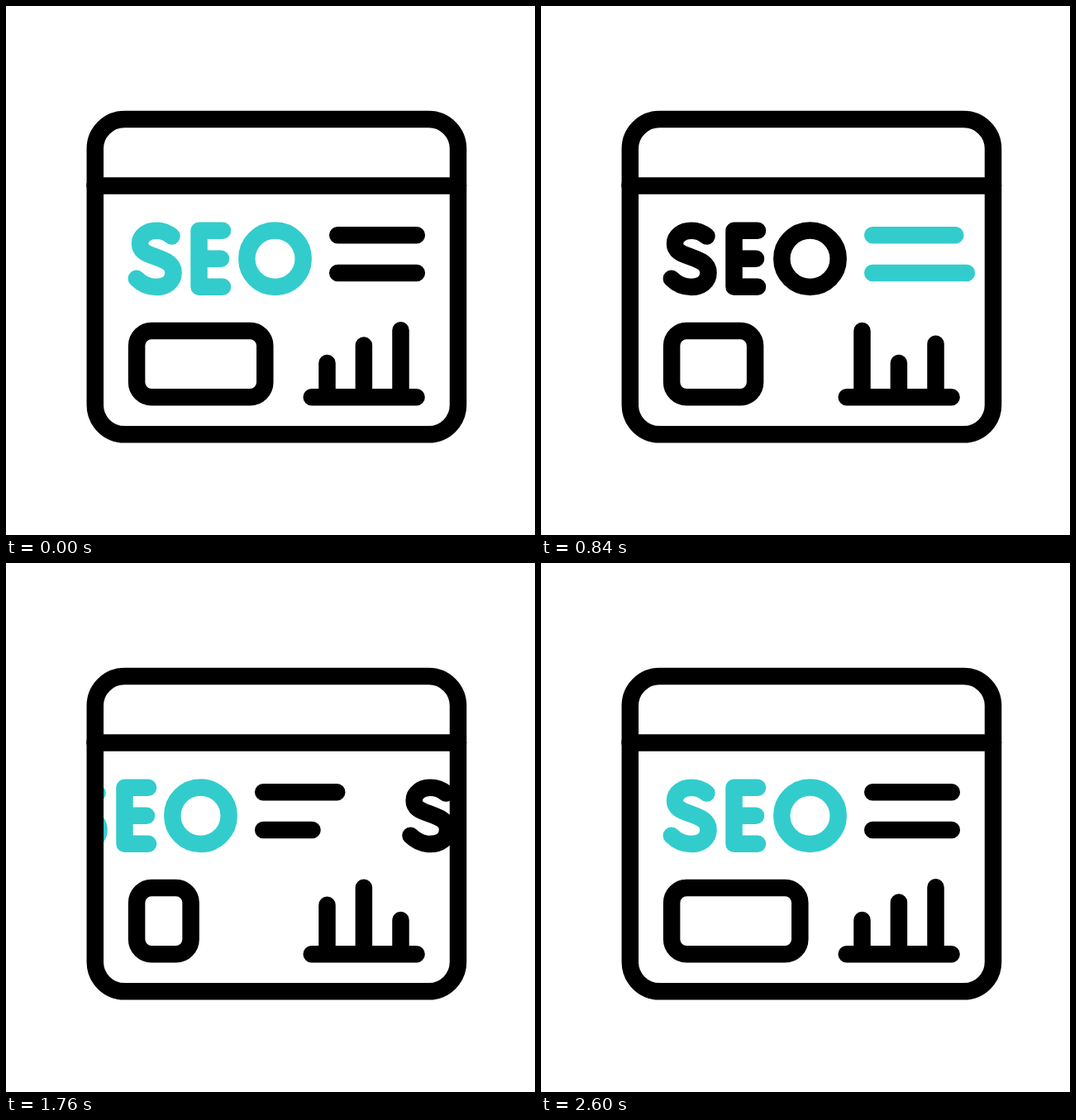
Animation, 640 px wide and 640 px high, one loop 2.62 s. Source, as an HTML page:

```html
<!DOCTYPE html>
<html lang="en">
<head>
<meta charset="utf-8">
<title>SEO browser window</title>
<style>
  html, body { margin: 0; height: 100%; overflow: hidden; background: #fff; }
  svg { display: block; width: 100%; height: 100%; }
  g { fill: none; stroke-width: 20.5; stroke-linecap: round; stroke-linejoin: round; }
  .ink { stroke: #000; }
  .teal { stroke: #3cc; }
</style>
</head>
<body>
<svg viewBox="0 0 640 640">
  <defs>
    <clipPath id="page"><rect x="112" y="222" width="431" height="290"/></clipPath>
    <g id="seo">
      <path d="M200.5 278.5C195 274 189 271.7 182 271.7C171 271.7 162 278 162 287.5C162 296 168 299 181 303.5C192 307.5 202.5 311 202.5 322.5C202.5 334 193 340 181.5 340C172 340 164 336 157.8 329.8"/>
      <path d="M262 271.8H233.5V339.8H262M233.5 305.8H260"/>
      <circle cx="325.5" cy="305.8" r="34.2"/>
    </g>
  </defs>
  <g clip-path="url(#page)">
    <g id="stripA"><use href="#seo" class="teal"/><path class="ink"/></g>
    <g id="stripB"><use href="#seo" class="ink"/><path class="teal"/></g>
  </g>
  <g class="ink">
    <rect x="107.8" y="137" width="439.2" height="381.3" rx="35.5"/>
    <path d="M107.5 217.5H547"/>
    <rect id="box" x="158.1" y="392.9" height="80.3" rx="18"/>
    <path id="chart"/>
  </g>
</svg>
<script>
const LOOP = 2620, EXIT = 416, ENTER = -444, FULL = 95.6;
const $ = id => document.getElementById(id);

// Smoothly eased track through [time, value] keys.
function track(t, ...keys) {
  if (t <= keys[0][0]) return keys[0][1];
  for (let i = 1; i < keys.length; i++) {
    const [t0, a] = keys[i - 1], [t1, b] = keys[i];
    if (t < t1) {
      const s = (t - t0) / (t1 - t0);
      return a + (b - a) * s * s * (3 - 2 * s);
    }
  }
  return keys[keys.length - 1][1];
}

const grow = (t, start, peak, end, top) => track(t, [start, 0], [peak, top], [end, FULL]);

function drawStrip(id, x, upper, lower) {
  const strip = $(id);
  strip.setAttribute('transform', `translate(${x})`);
  const line = (y, len) => len > 0 ? `M401.2 ${y}h${len}` : '';
  strip.lastElementChild.setAttribute('d', line(277.3, upper) + line(323, lower));
}

function draw(t) {
  const first = track(t, [-3, 0], [785, 1]);
  const second = track(t, [1201, 0], [1989, 1]);

  if (t < 1100) drawStrip('stripA', EXIT * first, FULL, FULL);
  else drawStrip('stripA', ENTER * (1 - second),
    grow(t, 1433, 1924, 2091, 120), grow(t, 1517, 2006, 2174, 119));

  if (t < 1100) drawStrip('stripB', ENTER * (1 - first),
    grow(t, 229, 720, 887, 120), grow(t, 221, 786, 952, 120));
  else drawStrip('stripB', second < 1 ? EXIT * second : ENTER, FULL, FULL);

  const right = track(t, [0, 323.6], [360, 337.3], [1000, 257], [2120, 226.5], [2600, 323.6]);
  $('box').setAttribute('width', right - 168.4);

  const bar = (x, a, b, c) =>
    `M${x} 473.3V${track(t, [0, a], [867, b], [1733, c], [2600, a])}`;
  $('chart').setAttribute('d', 'M369.7 473.3H496.6'
    + bar(388.5, 432, 392.8, 413.8)
    + bar(432.9, 410.5, 432, 392.8)
    + bar(477.5, 392.3, 408.8, 432));
}

function frame(now) {
  draw(now % LOOP);
  requestAnimationFrame(frame);
}
draw(0);
requestAnimationFrame(frame);
</script>
</body>
</html>
```
